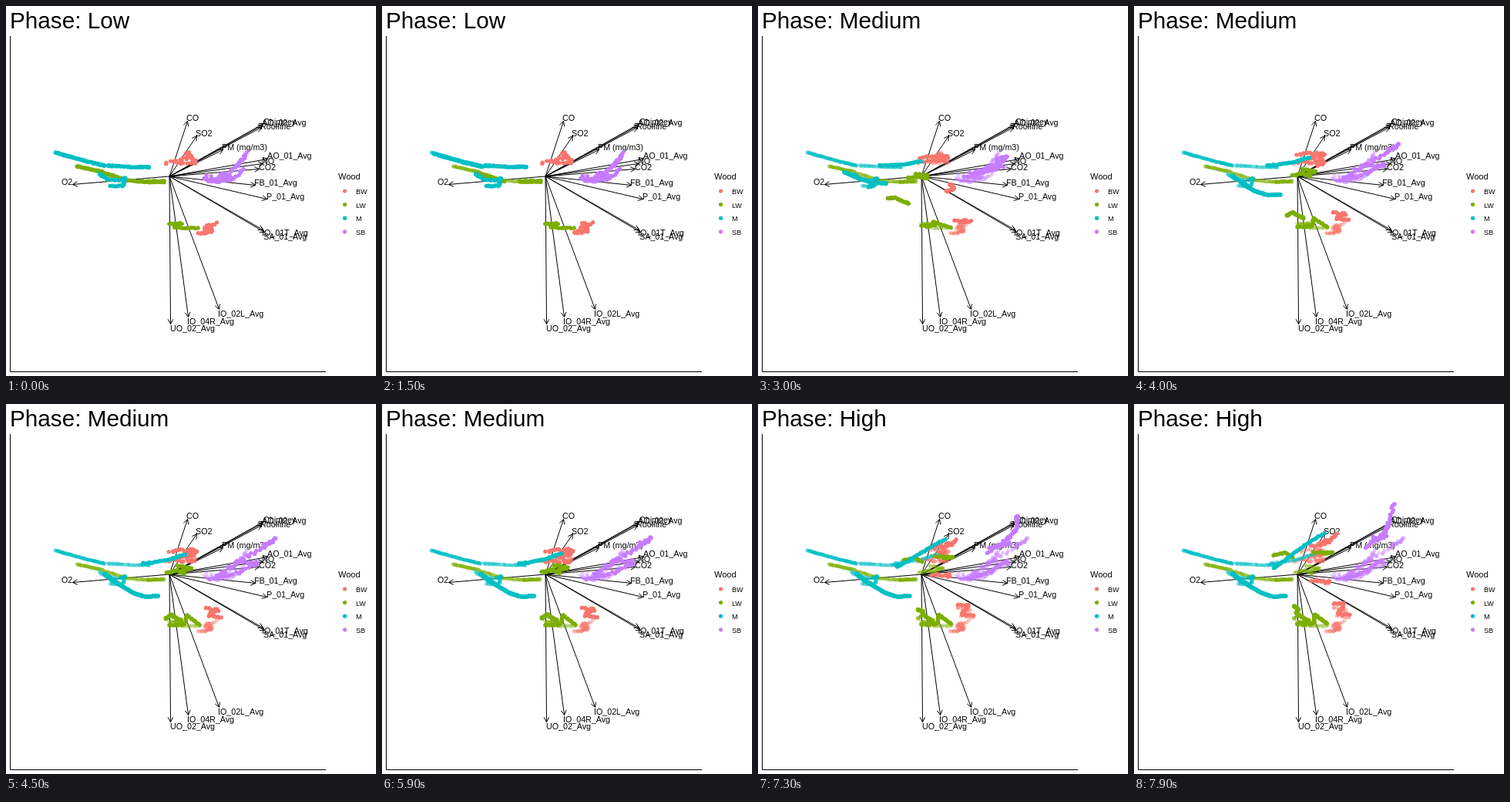
Recreate the animation shown at these times as an HTML page with a canvas. Size 480 by 480 pixels, loop 8000 ms.

```html
<!DOCTYPE html>
<html>
<head>
<meta charset="utf-8">
<style>
  html, body { margin: 0; width: 100%; height: 100%; overflow: hidden; background: #fff; }
  canvas { display: block; }
</style>
</head>
<body>
<canvas id="stage" width="480" height="480"></canvas>
<script>
const ctx = document.getElementById('stage').getContext('2d');
const LOOP = 8000, STEP = 100, STEPS = 29;
const ORIGIN = [212, 221];
const FONT = '"Liberation Sans", Arial, sans-serif';
const COLORS = { BW: '#f8766d', LW: '#7cae00', M: '#00bfc4', SB: '#c77cff' };

// label, arrow tip x/y, text left, text baseline
const ARROWS = [
  ['CO', 235, 149, 234, 149], ['SO2', 247, 168, 246, 169],
  ['PM (mg/m3)', 281, 186, 280, 187], ['Chimney', 334, 152, 334, 154],
  ['AO_02_Avg', 333, 154, 332, 155], ['Roofline', 331, 157, 330, 160],
  ['AO_01_Avg', 339, 198, 339, 198], ['NO', 333, 204, 332, 205],
  ['CO2', 328, 211, 328, 213], ['FB_01_Avg', 323, 232, 322, 233],
  ['P_01_Avg', 338, 250, 338, 251], ['IO_01T_Avg', 333, 290, 332, 298],
  ['SA_01_Avg', 335, 293, 334, 303], ['IO_02L_Avg', 276, 393, 275, 403],
  ['IO_04R_Avg', 236, 403, 235, 413], ['UO_02_Avg', 213, 412, 213, 422],
  ['O2', 86, 231, 72, 232]
];

// wood, count, scatter, then the path in the Low, Medium and High phase
const RUNS = [
  ['BW', 24, 2, '206,203 247,203 235,191', '212,190 246,191 240,196', '238,182 254,176 270,158'],
  ['BW', 18, 2, '222,200 240,195 234,190', '214,203 244,205 228,197', '238,238 254,242 262,243'],
  ['BW', 18, 1.5, '255,294 268,290 260,284', '236,196 244,194 240,188', '242,178 258,170 248,174'],
  ['BW', 24, 1.5, '249,295 266,293 257,288 272,281', '258,265 275,267 262,274 280,278', '259,256 272,256 264,272 281,272'],
  ['LW', 28, 0.5, '92,208 120,214'],
  ['LW', 28, 1, '120,214 157,226', '207,279 214,273 222,279 228,281', '208,256 213,264 206,268 222,280'],
  ['LW', 12, 0.6, '157,226 176,228'],
  ['LW', 18, 0.8, '177,228 205,228', '209,219 222,216 232,220', '170,188 185,184 196,190'],
  ['LW', 18, 0.8, '182,228 205,227', '222,210 241,213 228,216', '236,186 266,185 252,186'],
  ['LW', 32, 0.8, '212,283 228,282 218,288 249,288', '211,287 232,286 234,274 252,287', '212,284 235,284 234,272 250,284'],
  ['M', 80, 0.6, '64,190 85,196 110,203 128,207', '150,236 165,245 180,250 197,249', '150,236 165,245 180,250 197,249'],
  ['M', 36, 0.8, '132,207 150,208 172,209 186,209', '177,207 195,205 214,201 232,195', '183,215 200,199 222,178 252,157'],
  ['M', 50, 1, '121,218 133,225 150,226 155,223 152,233 135,233', '128,220 140,230 150,236', '128,220 140,230 150,236'],
  ['SB', 42, 2, '259,225 275,228 290,221 278,218', '290,212 318,196 350,175 334,185', '304,176 326,158 322,150 339,107'],
  ['SB', 22, 1.6, '290,215 302,204 312,191', '266,227 300,219 327,207', '275,226 300,216 321,200'],
  ['SB', 20, 2, '262,221 290,226 309,213', '272,224 300,204 325,206', '326,152 318,168 330,158']
];

const noise = k => {
  const v = Math.sin(k * 12.9898) * 43758.5453;
  return 2 * (v - Math.floor(v)) - 1;
};
const lerp = (a, b, p) => a + (b - a) * p;
const mix = (a, b, p) => [lerp(a[0], b[0], p), lerp(a[1], b[1], p)];
const clamp = v => Math.max(0, Math.min(1, v));

function spread(path, n, scatter, seed) {
  if (!path) return null;
  const pts = path.split(' ').map(s => s.split(',').map(Number));
  return Array.from({ length: n }, (_, i) => {
    const u = i / (n - 1) * (pts.length - 1);
    const s = Math.min(pts.length - 2, Math.floor(u));
    const [x, y] = mix(pts[s], pts[s + 1], u - s);
    return [x + noise(seed + i * 2.1) * scatter, y + noise(seed + i * 3.7 + 9) * scatter];
  });
}

const clouds = RUNS.map(([wood, n, scatter, ...paths], r) => ({
  color: COLORS[wood],
  states: [0, 1, 2].map(s => spread(paths[s], n, scatter, r * 101 + s * 31 + 1))
}));

function dot([x, y], color) {
  ctx.fillStyle = color;
  ctx.beginPath();
  ctx.arc(x, y, 2.6, 0, 7);
  ctx.fill();
}

function ghost([x, y], color) {
  ctx.globalAlpha = 0.36;
  ctx.fillStyle = ctx.strokeStyle = color;
  ctx.lineWidth = 0.9;
  ctx.beginPath();
  ctx.arc(x, y, 2.1, 0, 7);
  ctx.fill();
  ctx.stroke();
  ctx.globalAlpha = 1;
}

function text(str, x, y, size) {
  ctx.fillStyle = '#000';
  ctx.font = size + 'px ' + FONT;
  ctx.fillText(str, x, y);
}

function arrow(x, y) {
  const a = Math.atan2(y - ORIGIN[1], x - ORIGIN[0]);
  const wing = d => [x - 7 * Math.cos(a + d), y - 7 * Math.sin(a + d)];
  ctx.beginPath();
  ctx.moveTo(...ORIGIN);
  ctx.lineTo(x, y);
  ctx.moveTo(...wing(0.5));
  ctx.lineTo(x, y);
  ctx.lineTo(...wing(-0.5));
  ctx.stroke();
}

function drawPlot(phase) {
  ctx.fillStyle = '#fff';
  ctx.fillRect(0, 0, 480, 480);
  text('Phase: ' + phase, 5, 29, 29.7);
  ctx.strokeStyle = '#000';
  ctx.lineWidth = 1;
  ctx.beginPath();
  ctx.moveTo(5.5, 39);
  ctx.lineTo(5.5, 474.5);
  ctx.lineTo(415, 474.5);
  ctx.stroke();
  for (const [, x, y] of ARROWS) arrow(x + 0.5, y + 0.5);
  for (const [label, , , x, y] of ARROWS) text(label, x, y, 10.7);
  text('Wood', 431, 225, 11);
  Object.keys(COLORS).forEach((wood, i) => {
    const y = 240 + i * 17.6;
    dot([439.5, y], COLORS[wood]);
    text(wood, 454, y + 4, 9);
  });
}

function render(time) {
  const k = Math.floor(time / STEP);
  const toMedium = clamp((k - 14) / STEPS), toHigh = clamp((k - 58) / STEPS);
  const phase = toHigh > 0.5 ? 'High' : toMedium > 0.5 ? 'Medium' : 'Low';
  drawPlot(phase);

  const from = toHigh > 0 || toMedium === 1 ? 1 : 0;
  const p = from ? toHigh : toMedium;
  const past = (toMedium > 0) + (toHigh > 0);
  for (const { color, states } of clouds)
    for (let s = 0; s < past; s++)
      if (states[s]) states[s].forEach(pt => ghost(pt, color));
  for (const { color, states } of clouds) {
    const a = states[from], b = states[from + 1];
    if (!a || (p > 0 && !b)) continue;
    a.forEach((pt, i) => dot(p > 0 ? mix(pt, b[i], p) : pt, color));
  }
}

function tick(now) {
  render(now % LOOP);
  requestAnimationFrame(tick);
}
render(0);
requestAnimationFrame(tick);
</script>
</body>
</html>
```
